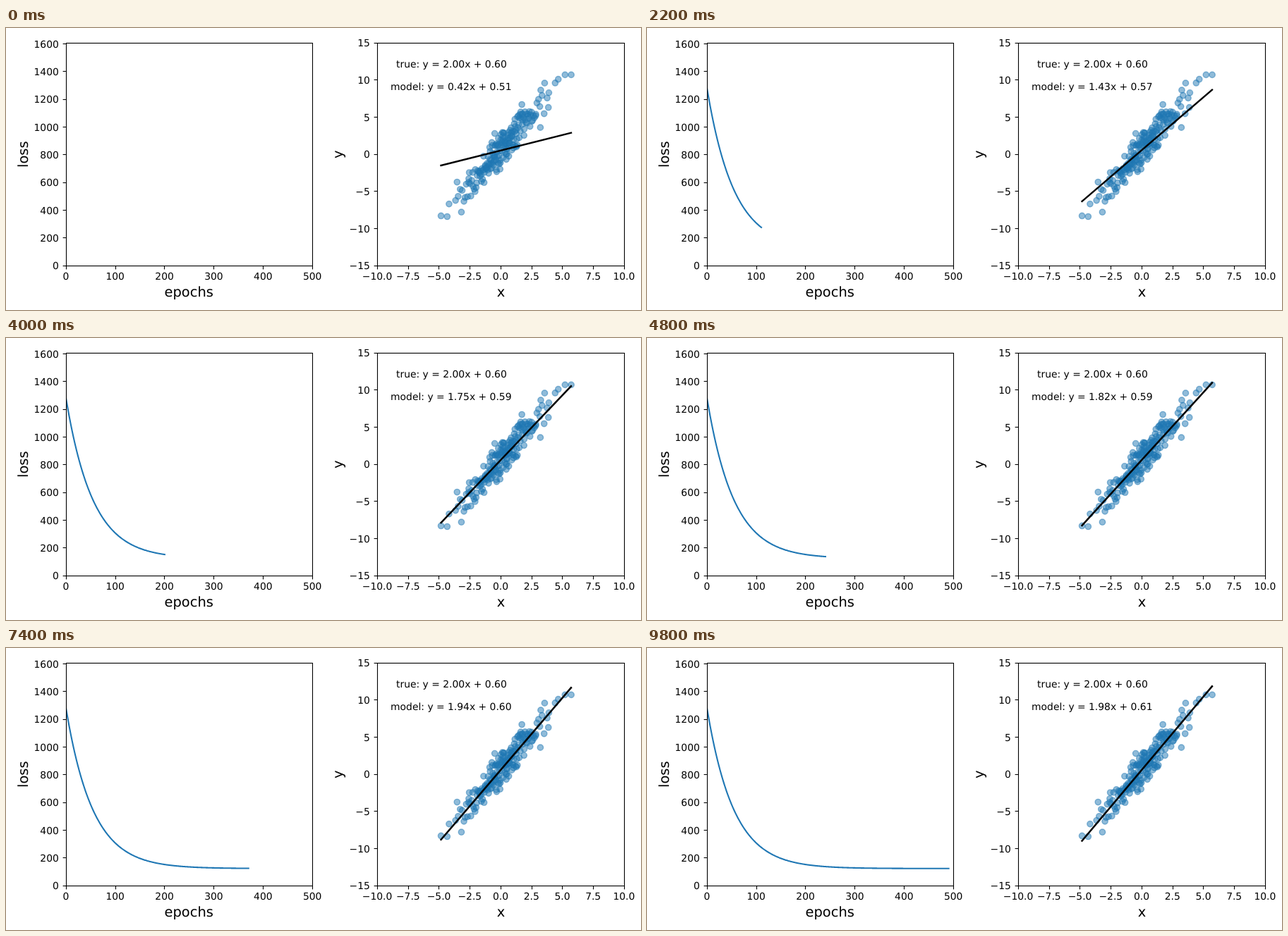
Write an HTML page that moves like this. It is 900x400 px and loops after 10000 ms.

```html
<!DOCTYPE html>
<html lang="en">
<head>
<meta charset="utf-8">
<title>Linear regression training</title>
<style>
  html, body { margin: 0; width: 100%; height: 100%; overflow: hidden; background: #fff; }
  svg { display: block; width: 900px; height: 400px; }
  text { font: 13.89px "DejaVu Sans", sans-serif; fill: #000; text-anchor: middle; text-rendering: geometricPrecision; }
  text.right { text-anchor: end; }
  text.label { font-size: 19.44px; }
  .axis { fill: none; stroke: #000; stroke-width: 1.11; }
  #dots circle { fill: #1f77b4; fill-opacity: .5; stroke: #1f77b4; stroke-opacity: .5; stroke-width: 1.39; }
  #loss { fill: none; stroke: #1f77b4; stroke-width: 2.08; stroke-linejoin: round; stroke-linecap: square; }
  #fit { stroke: #000; stroke-width: 2.5; stroke-linecap: square; }
</style>
</head>
<body>
<svg viewBox="0 0 900 400">
  <clipPath id="plot"><rect x="85.5" y="21.5" width="349" height="316"/></clipPath>
  <g id="dots"></g>
  <g clip-path="url(#plot)"><path id="loss"/></g>
  <line id="fit"/>
  <g id="axes"></g>
  <text x="631.4" y="56">true: y = 2.00x + 0.60</text>
  <text id="model" x="630.8" y="88"></text>
</svg>
<script>
const STEP_MS = 200, STEPS = 50, EPOCHS_PER_STEP = 10;
const TOP = 21.5, BOTTOM = 337.5, TICK = 4.9;
const byId = id => document.getElementById(id);

function add(parent, tag, attrs, text = '') {
  const el = document.createElementNS('http://www.w3.org/2000/svg', tag);
  for (const key in attrs) el.setAttribute(key, attrs[key]);
  el.textContent = text;
  parent.append(el);
}

const scale = (d0, d1, p0, p1) => v => p0 + (v - d0) / (d1 - d0) * (p1 - p0);
const epochX = scale(0, 500, 85.2, 434.6);
const lossY = scale(0, 1600, 337, 22.4);
const dataX = scale(-10, 10, 526.5, 876.3);
const dataY = scale(-15, 15, 337, 21.1);

const axes = byId('axes');
const snap = v => Math.floor(v) + .5;
const minus = s => String(s).replace('-', '\u2212');
const range = (from, to, by) => Array.from({ length: Math.round((to - from) / by) + 1 }, (_, i) => from + i * by);

function drawAxes(left, right, xs, ys, toX, toY, digits) {
  add(axes, 'rect', { class: 'axis', x: left, y: TOP, width: right - left, height: BOTTOM - TOP });
  for (const v of xs) {
    add(axes, 'path', { class: 'axis', d: `M${snap(toX(v))} ${BOTTOM}v${TICK}` });
    add(axes, 'text', { x: toX(v) - .4, y: 357 }, minus(v.toFixed(digits)));
  }
  for (const v of ys) {
    add(axes, 'path', { class: 'axis', d: `M${left} ${snap(toY(v))}h${-TICK}` });
    add(axes, 'text', { class: 'right', x: left - 10.7, y: toY(v) + 5.2 }, minus(v));
  }
}

function label(text, x, y, angle = 0) {
  add(axes, 'text', { class: 'label', transform: `translate(${x} ${y}) rotate(${angle})` }, text);
}

drawAxes(85.5, 434.5, range(0, 500, 100), range(0, 1600, 200), epochX, lossY, 0);
drawAxes(526.5, 876.5, range(-10, 10, 2.5), range(-15, 15, 5), dataX, dataY, 1);
label('epochs', 259.2, 381);
label('loss', 30.7, 179.2, -90);
label('x', 701.4, 381);
label('y', 477, 179.2, -90);

let seed = 7;
const random = () => (seed = seed * 16807 % 2147483647) / 2147483647;

// Bell-shaped spread along x, with triangular noise around the true line.
const SAMPLES = 186;
const samples = range(0, SAMPLES - 1, 1).map(i => {
  const q = .03 + .94 * (i + random()) / SAMPLES;
  const x = .15 + 1.1 * Math.log(q / (1 - q));
  return [x, 2 * x + .6 + 2.5 * (random() + random() - 1)];
});
const extremes = [
  [-4.85, -8.3], [-4.35, -8.4], [-4.2, -6.7], [-3.55, -3.75], [-3.2, -7.8], [-2.6, -3.3], [-.5, 2.8],
  [1.7, 6.7], [3.2, 3.6], [3.85, 6.3], [4.4, 9.6], [4.65, 10.1], [5.2, 10.7], [5.7, 10.7]
];
for (const [x, y] of [...extremes, ...samples]) add(byId('dots'), 'circle', { cx: dataX(x), cy: dataY(y), r: 4.17 });

const slope = e => 1.992 - 1.576 * Math.exp(-.0093 * e);
const bias = e => .608 - .094 * Math.exp(-.0082 * e);
const loss = e => 123 + 1152 * Math.exp(-.0184 * e);

function draw(epoch) {
  const w = slope(epoch), b = bias(epoch);
  const points = range(0, epoch, 1).map(e => `${epochX(e).toFixed(2)} ${lossY(loss(e)).toFixed(2)}`);
  byId('loss').setAttribute('d', epoch ? 'M' + points.join('L') : '');
  [-4.85, 5.69].forEach((x, i) => {
    byId('fit').setAttribute('x' + (i + 1), dataX(x));
    byId('fit').setAttribute('y' + (i + 1), dataY(w * x + b));
  });
  byId('model').textContent = `model: y = ${w.toFixed(2)}x + ${b.toFixed(2)}`;
}

const start = performance.now();
function tick() {
  const elapsed = Math.max(0, performance.now() - start);
  draw(Math.floor(elapsed / STEP_MS) % STEPS * EPOCHS_PER_STEP);
  requestAnimationFrame(tick);
}
tick();
</script>
</body>
</html>
```
